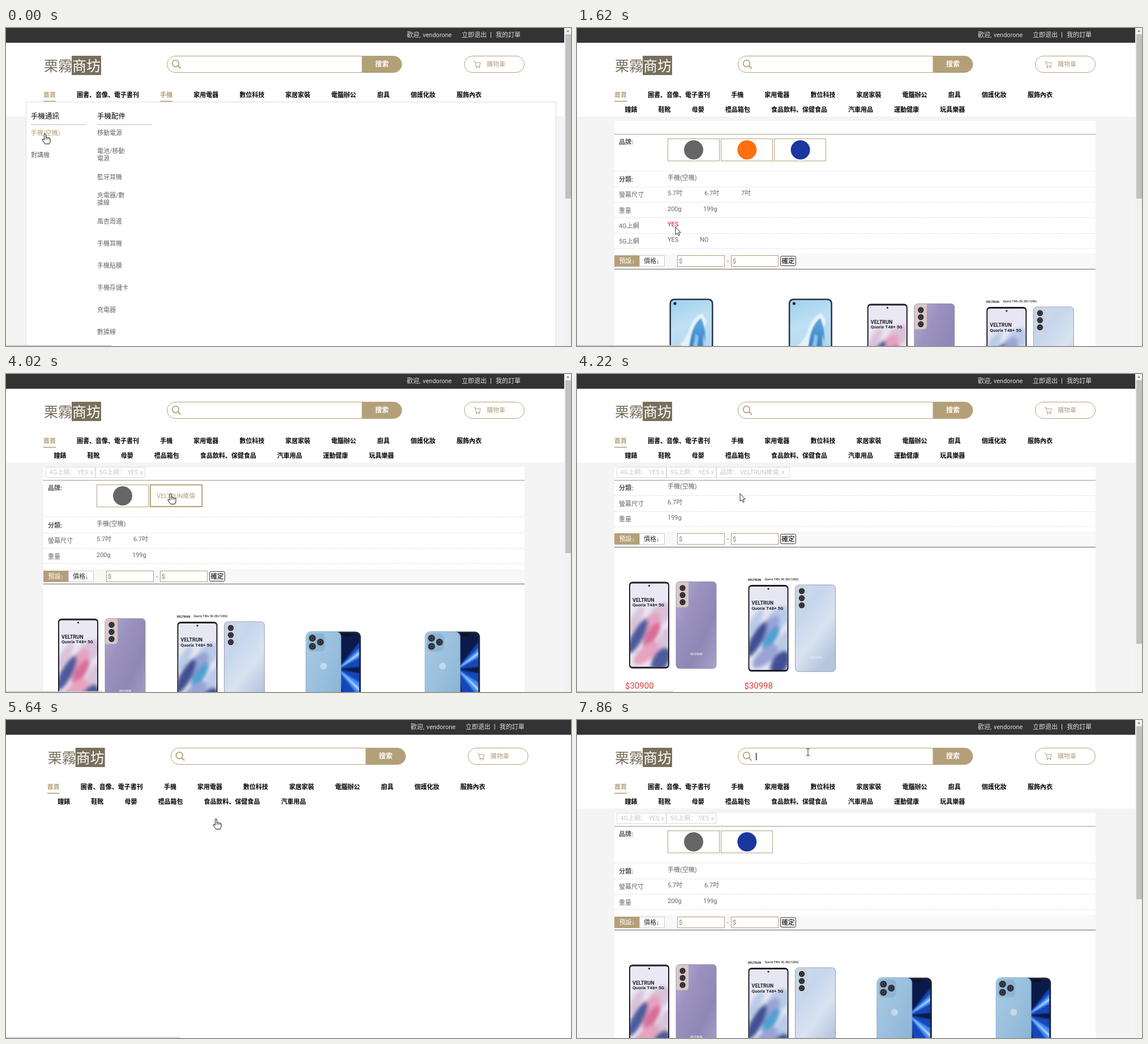
An HTML page for the animation above (8 s loop, 998 by 561 pixels).

```html
<!DOCTYPE html>
<html lang="zh-Hans">
<head>
<meta charset="utf-8">
<title>Shop filter</title>
<style>
html, body { margin: 0; width: 100%; height: 100%; overflow: hidden; background: #fff; }
svg { display: block; width: 998px; height: 561px; }
text { font-family: Roboto, 'Liberation Sans', 'Noto Sans CJK SC', 'Noto Sans CJK', sans-serif; white-space: pre; }
</style>
</head>
<body>
<svg viewBox="0 0 998 561"><defs id="defs"></defs><g id="stage"></g></svg>
<script>
const LOOP = 8000, TICK = 201.5;
const GOLD = '#b4a078', GRAY = '#666', PALE = '#c8c8c8';
const BRAND = 'VELTRUN', MODEL = 'Quorix T48+ 5G';
const $ = id => document.getElementById(id);

// y is the vertical middle of the line
const text = (x, y, s, fill = GRAY, size = 11, extra = '') =>
  `<text x="${x}" y="${y + size * .37}" font-size="${size}" fill="${fill}" ${extra}>${s}</text>`;
const bold = (x, y, s, fill = '#000', size = 11, extra = '') =>
  text(x, y, s, fill, size, 'font-weight="700" ' + extra);
const rect = (x, y, w, h, fill, extra = '') =>
  `<rect x="${x}" y="${y}" width="${w}" height="${h}" fill="${fill}" ${extra}/>`;
const frame = (x, y, w, h, stroke, fill = '#fff', sw = 1) =>
  rect(x + .5, y + .5, w - 1, h - 1, fill, `stroke="${stroke}" stroke-width="${sw}"`);
const hline = (x1, x2, y, stroke, extra = '') =>
  `<path d="M${x1} ${y}H${x2}" stroke="${stroke}" ${extra}/>`;
const dot = (x, y, r, fill) => `<circle cx="${x}" cy="${y}" r="${r}" fill="${fill}"/>`;
const blob = (x, y, rx, ry, rot, fill) =>
  `<ellipse cx="${x}" cy="${y}" rx="${rx}" ry="${ry}" fill="${fill}" transform="rotate(${rot} ${x} ${y})"/>`;
const shape = (d, fill) => `<path d="${d}" fill="${fill}"/>`;
const grad = (id, dir, ...colors) => `<linearGradient id="${id}" ${dir}>` + colors.map((c, i) =>
  `<stop offset="${i / (colors.length - 1)}" stop-color="${c}"/>`).join('') + '</linearGradient>';
const clip = (id, x, y, w, h, r) => `<clipPath id="${id}">${rect(x, y, w, h, '#000', `rx="${r}"`)}</clipPath>`;
const use = (id, x, y) => `<use href="#${id}" x="${x}" y="${y}"/>`;
const lens = (x, y, r) => dot(x, y, r, '#2a2a33') + dot(x, y, r * .55, '#4b4b58') + dot(x, y, r * .25, '#111');

function duoPhone(id, base, [mist, flame, glow, deep], bump) {
  const smoke = blob(54, 58, 24, 16, -50, mist) + blob(12, 66, 8, 26, 30, mist) +
    blob(34, 78, 13, 30, 40, flame) + blob(40, 94, 9, 26, 32, glow) +
    blob(15, 96, 10, 34, 28, deep) + blob(58, 112, 11, 34, 22, mist) +
    blob(30, 126, 12, 28, 48, flame) + blob(56, 138, 14, 24, 30, deep);
  return `<g id="${id}">` + rect(0, 0, 71, 153, '#1f1d26', 'rx="6"') + rect(2, 3, 67, 147, base, 'rx="4"') +
    `<g clip-path="url(#duoClip)"><g filter="url(#soft)">${smoke}</g></g>` + dot(35.5, 7, 1.6, '#222') +
    bold(6, 32, BRAND, '#22222c', 9) + bold(6, 41, MODEL, '#22222c', 8) +
    rect(83, 0, 71, 153, `url(#${id}Back)`, 'rx="6" stroke="#8d87a3" stroke-width=".8"') +
    shape('M83.5 45V6q0-5.500 6-5.500H105V39q0 6-6 6Z', bump) +
    [11, 23.5, 36].map(y => lens(94.5, y, 5.2)).join('') +
    bold(118.5, 128, BRAND, '#e9e6f2', 5, 'text-anchor="middle"') + '</g>';
}

const waterPhone = '<g id="water">' + rect(0, 0, 77, 160, '#25334a', 'rx="8"') +
  rect(2.5, 2.5, 72, 155, 'url(#sky)', 'rx="6"') + '<g clip-path="url(#waterClip)"><g filter="url(#haze)">' +
  shape('M0 92Q24 84 34 56T58 26L66 40 30 130 0 160Z', '#e6f2fa') +
  shape('M8 132Q32 106 36 76T56 34Q64 52 63 76T77 108V160H0Z', 'url(#wave)') +
  shape('M46 62Q42 96 20 128L30 132Q50 100 51 66Z', '#8cc4ea') +
  shape('M60 62Q56 96 68 128L77 130V104Q64 88 60 62Z', '#9fd0ee') +
  '</g></g>' + dot(9.5, 8.5, 2.6, '#1b2533') + '</g>';

const rayPhone = '<g id="ray">' + rect(46, 0, 51, 150, '#1d2536', 'rx="9"') + rect(50, 3, 44, 144, '#0a1a4a', 'rx="7"') +
  '<g clip-path="url(#rayClip)"><g filter="url(#haze)">' +
  shape('M56 66L98 14V62ZM56 66L98 74V160H76Z', '#1546b8') +
  shape('M56 66L98 26V44ZM56 66L98 92V120Z', '#3f8cf5') +
  shape('M58 65L98 33V38ZM58 67L98 103V109Z', '#b4dcff') +
  '</g></g>' + rect(64, 3, 16, 5, '#10131c', 'rx="2.5"') +
  rect(0, 0, 62, 150, 'url(#pale)', 'rx="9" stroke="#7fa3bf" stroke-width=".8"') +
  rect(3, 3, 31, 32, '#8db4d2', 'rx="8"') + lens(11.5, 11.5, 6) + lens(11.5, 26, 6) + lens(25.5, 18.5, 6) +
  dot(31, 61, 6, '#c6d9e7') + '</g>';

$('defs').innerHTML =
  grad('duoABack', 'x2="1" y2="1"', '#b7afd2', '#9a91bf', '#8f87b4', '#aaa2ca') +
  grad('duoBBack', 'x2=".6" y2="1"', '#d3dcec', '#c6d6ec', '#d9e3f0', '#b5c5de') +
  grad('sky', 'x2=".2" y2="1"', '#9fd0ee', '#bfe0f3', '#b4d8ef', '#a5cdea') +
  grad('wave', 'x2="0" y2="1"', '#5fa9de', '#3179bd', '#1f5c9f') +
  grad('pale', 'x2="1" y2="1"', '#a9cbe4', '#98bfdd', '#87b0d0') +
  '<filter id="soft"><feGaussianBlur stdDeviation="3"/></filter>' +
  '<filter id="haze"><feGaussianBlur stdDeviation="1"/></filter>' +
  clip('duoClip', 2, 3, 67, 147, 4) + clip('waterClip', 2.5, 2.5, 72, 155, 6) + clip('rayClip', 50, 3, 44, 144, 7) +
  duoPhone('duoA', '#eae8f2', ['#d9c3da', '#e6a3c0', '#d96c98', '#4d5a9c'], '#d9c7c6') +
  duoPhone('duoB', '#e6e7f2', ['#b9cbe8', '#9aa3d6', '#4f9fd0', '#3f4f94'], '#c9d3e2') +
  waterPhone + rayPhone;

const NAV = ['首頁', '圖書、音像、電子書刊', '手機', '家用電器', '數位科技', '家居家裝', '電腦辦公', '廚具', '個護化妝', '服飾內衣'];
const NAV2 = ['鐘錶', '鞋靴', '母嬰', '禮品箱包', '食品飲料、保健食品', '汽車用品', '運動健康', '玩具樂器'];

function navRow(names, x, y, lit = []) {
  return names.map(s => {
    const on = lit.includes(s), w = s.length * 11;
    const out = bold(x, y, s, on ? GOLD : '#000') + (on ? rect(x, 128.5, w, 1.6, GOLD) : '');
    x += w + 37.1;
    return out;
  }).join('');
}

function header(lit, count2) {
  return text(708, 12, '歡迎, ', '#ddd') + text(736, 12, 'vendorone', '#ddd') +
    text(805, 12, '立即退出', '#ddd') + rect(856, 7, 1, 10, '#ddd') + text(865, 12, '我的訂單', '#ddd') +
    text(67, 67, '栗霧', '#796f5c', 25) + rect(116, 49, 52, 34, '#796f5c') + text(117, 67, '商坊', '#fff', 25) +
    rect(284.5, 49.5, 414.5, 29, '#fff', `rx="14.5" stroke="${GOLD}"`) +
    shape('M628.5 49.500H684.500a14.500 14.500 0 0 1 0 29H628.500Z', GOLD) +
    bold(652, 64, '搜索', '#fff', 12) +
    `<g fill="none" stroke="${GOLD}"><circle cx="299.500" cy="62.500" r="5.800" stroke-width="1.700"/>
     <path d="M303.700 66.700L308.500 71.500" stroke-width="2"/>
     <path d="M826 59H828.500L830.500 67.500H836.500L838 61H829"/><circle cx="831" cy="69.500" r="1"/><circle cx="836" cy="69.500" r="1"/></g>` +
    rect(809.5, 49.5, 106, 29, 'none', `rx="14.5" stroke="${GOLD}"`) + text(849, 64, '購物車', GOLD) +
    navRow(NAV, 66, 118, lit) + navRow(NAV2.slice(0, count2), 84.5, 144);
}

function scrollbar(end) {
  return rect(986, 0, 12, 561, '#f1f1f1') + rect(988, 11, 10, end - 11, '#c1c1c1') +
    shape('M990 6.500L992.500 3.500 995 6.500Z', '#777');
}

function menu() {
  const accessories = [[185, '移動電源'], [217, '電池/移動'], [230, '電源'], [263, '藍牙耳機'], [295, '充電器/數'], [308, '據線'],
    [341, '風杏周邊'], [380, '手機耳機'], [419, '手機貼膜'], [458, '手機存儲卡'], [497, '充電器'], [536, '數據線']];
  const title = (x, s) => text(x, 155, s, '#000', 12.5, 'font-weight="500"') + hline(x, x + 97, 170.5, '#bbb');
  return frame(35, 130, 937, 440, '#ddd') + title(44, '手機通訊') + title(161, '手機配件') +
    text(44, 185, '手機(空機)', GOLD) + text(44, 224, '對講機') +
    accessories.map(([y, s]) => text(161, y, s)).join('');
}

const sizes = [[160, '5.7吋'], [225, '6.7吋'], [290, '7吋']];
const weights = [[160, '200g'], [223, '199g']];
const yesNo = [[160, 'YES'], [217, 'NO']];
const kind = ['分類:', [[160, '手機(空機)']]];
const LOGO = { gray: '#666', orange: '#ff6f0f', blue: '#1a37a0' };
const LISTS = [
  { bar: 301, status: 185, logos: ['gray', 'orange', 'blue'], goods: ['water', 'water', 'duoA', 'duoB'],
    rows: [kind, ['螢幕尺寸', sizes], ['重量', weights], ['4G上網', [[160, 'YES']]], ['5G上網', yesNo]] },
  { bar: 308, status: 184, logos: ['gray', 'orange', 'blue'], goods: ['water', 'water', 'duoA', 'duoB'],
    rows: [kind, ['螢幕尺寸', sizes], ['重量', weights], ['5G上網', yesNo]] },
  { bar: 316, status: 0, logos: ['gray', 'blue'], goods: ['duoA', 'duoB', 'ray', 'ray'],
    rows: [kind, ['螢幕尺寸', sizes.slice(0, 2)], ['重量', weights]] },
  { bar: 476, status: 170, logos: [], goods: ['duoA', 'duoB'], prices: ['$30900', '$30998'],
    rows: [kind, ['螢幕尺寸', [[160, '6.7吋']]], ['重量', [[160, '199g']]]] }
];
const PLACE = { water: [97.5, 52.5], duoA: [26, 61.5], duoB: [26.1, 67], ray: [43, 84.5] };

function tags(n) {
  const tag = (x, w, label, value, gap) =>
    frame(x, 164, w, 19, '#ddd') + text(x + 6.5, 173, label, PALE) + text(x + gap, 173, value, PALE);
  return [
    tag(70, 88, '4G上網：', 'YES x', 56.5),
    tag(158, 88, '5G上網：', 'YES x', 56.5),
    tag(246, 130, '品牌：', BRAND + '維倫; x', 42)
  ].slice(0, n).join('');
}

function sortBar(y, lineY) {
  const price = x => frame(x, y - 10, 84, 20, GOLD) + text(x + 3, y, '$', '#777');
  return rect(66, y - 13, 850, lineY - y + 13, '#f8f8f8') + hline(66, 916, lineY, '#666') +
    rect(66, y - 10, 44, 20, GOLD) + text(74.5, y, '預設↓', '#fff') +
    frame(110, y - 10, 45, 20, '#ccc') + text(118, y, '價格↓', '#333') +
    price(177) + text(265, y, '-') + price(272) +
    rect(359.5, y - 8.5, 27, 17, '#efefef', 'rx="2" stroke="#444"') + text(361.5, y, '確定', '#000', 11.5);
}

function list(n, hover) {
  const { rows, logos, goods, prices = [] } = LISTS[n];
  let out = rect(0, 156, 987, 405, '#f4f4f4') + rect(66, 164, 850, 397, '#fff') + tags(n) + hline(66, 916, 187.5, '#a0988a');
  const dashed = y => hline(66, 916, Math.floor(y) + .5, '#ddd', 'stroke-dasharray="2.4 1.5"');
  let y = 187.4;
  if (logos.length) {
    out += bold(74, 201, '品牌:', '#555');
    logos.forEach((c, i) => {
      const x = 160 + 94.3 * i;
      out += hover === 'brand' && i
        ? frame(x, 195, 92.5, 39.5, GOLD, '#fff', 2) + text(x + 46, 215, BRAND + '維倫', GOLD, 11, 'text-anchor="middle"')
        : frame(Math.floor(x), 195, 92, 40, GOLD) + dot(x + 46, 215, 17, LOGO[c]);
    });
    y += 65.5;
    out += dashed(y);
  }
  rows.forEach(([label, values], i) => {
    out += (i ? text : bold)(74, y + 14, label, i ? GRAY : '#555');
    values.forEach(([x, s], j) => {
      out += text(x, y + 11, s, hover === 'yes' && i === 3 && !j ? '#e00012' : GRAY);
    });
    y += 27.3;
    out += dashed(y);
  });
  const lineY = Math.floor(y + 36) + .5;
  y = Math.round(y + 22);
  out += sortBar(y, lineY);
  goods.forEach((id, i) => {
    const [dx, dy] = PLACE[id], x = 66 + 210.4 * i + dx, top = lineY + dy - .5;
    out += use(id, x, top);
    if (id === 'duoB') out += bold(x - 1, top - 9.5, BRAND, '#222', 5.5) + bold(x + 29, top - 9.5, MODEL + ' (8G/128G)', '#444', 5);
    if (prices[i]) out += text(85 + 210.4 * i, y + 258, prices[i], '#d93a3a', 15);
  });
  return out;
}

const CURSORS = {
  arrow: '<path d="M0 0V13.500L3 10.800 5.200 15.500 7.300 14.600 5.200 10H9.300Z" fill="#fff" stroke="#111" stroke-width=".9"/>',
  hand: `<path d="M-1.500 11.500V1.800a1.500 1.500 0 0 1 3 0V7.500a1.400 1.200 0 0 1 2.700 .3a1.400 1.200 0 0 1 2.600 .6a1.300 1.200 0 0 1 2.300 .8V13q0 3-1.800 5.500H-.3Q-2 15.500-4.800 12.200q-.8-1.700 .9-2.100Z" fill="#fff" stroke="#111"/>
    <path d="M1.500 7.500V11M4.200 8V11M6.800 8.500V11" stroke="#111" stroke-width=".8"/>`,
  beam: '<path d="M-3-6H-.8L0-5.300 .8-6H3M0-5.300V5.300M-3 6H-.8L0 5.300 .8 6H3" fill="none" stroke="#222"/>'
};

// cursor stops: tick, x, y
const PATH = [[0, 69, 186], [3, 69, 186], [7, 160, 334], [8, 174, 351], [9, 172, 346], [16, 173, 346], [20, 291, 211],
  [21, 288, 211], [22, 288, 211], [25, 371, 174], [30, 371, 174], [35, 408, 57]];

function cursorAt(k) {
  const i = PATH.findIndex(p => p[0] > k);
  if (i < 0) return PATH[PATH.length - 1].slice(1);
  const [a, ax, ay] = PATH[i - 1], [b, bx, by] = PATH[i];
  const u = (k - a) / (b - a), e = u * u * (3 - 2 * u);
  return [ax + (bx - ax) * e, ay + (by - ay) * e];
}

function draw(k, caret) {
  const blank = k === 1 || k === 2 || k === 27 || k === 28;
  const n = k < 10 ? 0 : k < 16 ? 1 : k < 21 ? 2 : k < 27 ? 3 : 2;
  const hover = k === 8 || k === 9 || (k >= 11 && k < 16) ? 'yes' : k === 20 ? 'brand' : '';
  const [x, y] = cursorAt(k);
  const pointing = k < 3 || (k > 8 && k < 17) || k === 20 || (k > 24 && k < 29);
  const cursor = pointing ? 'hand' : y < 78 ? 'beam' : 'arrow';
  let status = LISTS[n].status, out = rect(0, 0, 998, 561, '#fff') + rect(0, 0, 998, 26, '#333');
  if (blank) {
    out += `<g transform="translate(6.7)">${header(['首頁'], 6)}</g>`;
    status = 307;
  } else if (k === 0) {
    out += rect(0, 156, 987, 405, '#f4f4f4') + header(['首頁', '手機'], 0) + menu() + scrollbar(301);
    status = 186;
  } else {
    out += header(['首頁'], 8) + list(n, hover) + scrollbar(LISTS[n].bar);
    if (k === 20) status = 170;
  }
  if (status) out += rect(0, 559.5, status, 1.5, '#ccc');
  if (caret) out += rect(316, 58, 1.2, 13, '#000');
  $('stage').innerHTML = out + `<g transform="translate(${x} ${y})">${CURSORS[cursor]}</g>`;
}

let shown = '';
function tick(now) {
  const t = now % LOOP, k = Math.floor((t + 14) / TICK);
  const caret = (t >= 7040 && t < 7440) || t >= 7860;
  const key = k + '|' + caret;
  if (key !== shown) draw(k, caret);
  shown = key;
  requestAnimationFrame(tick);
}
tick(0);
</script>
</body>
</html>
```
